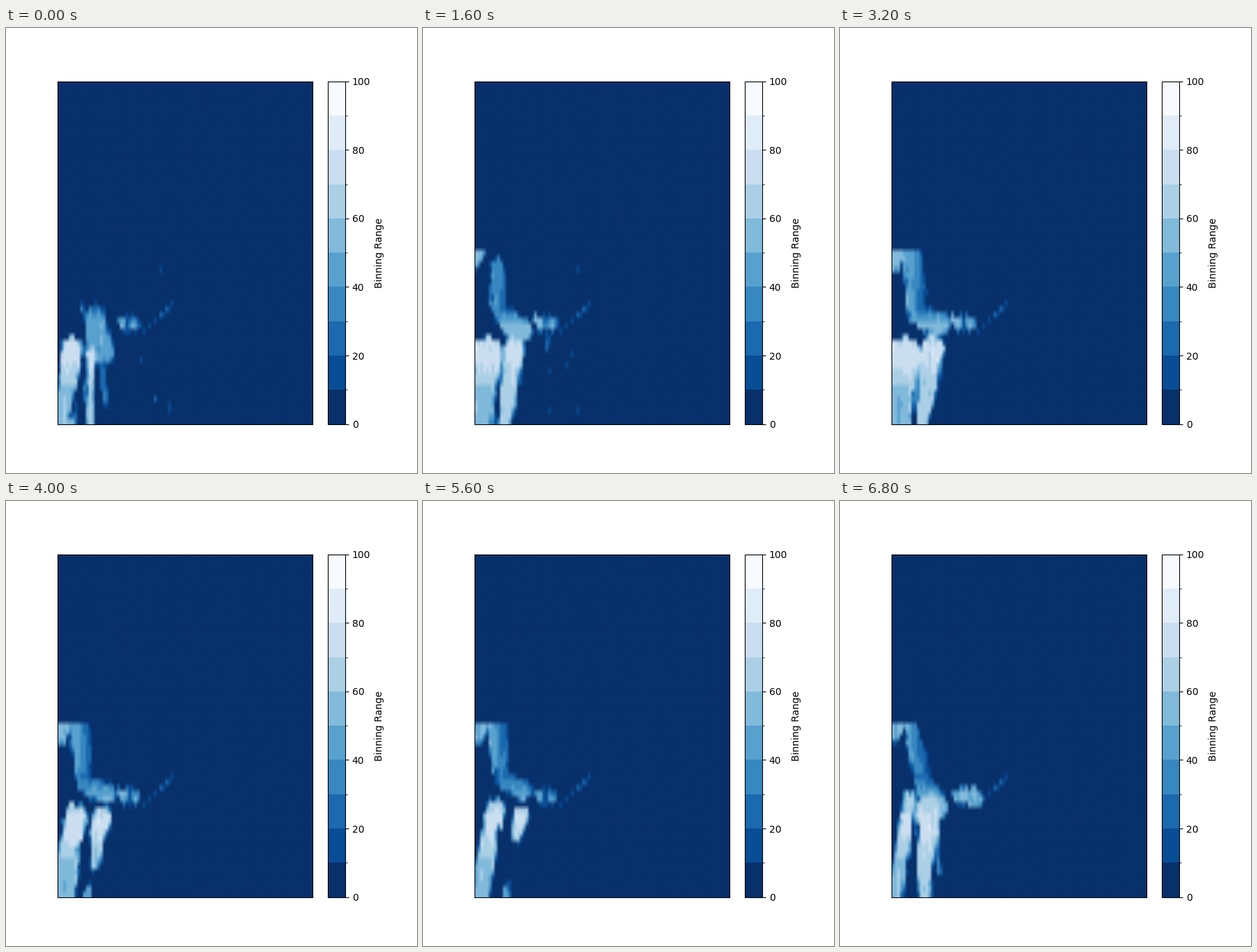
A matplotlib script for the animation above (7.2 s loop, 590x640 px).

```python
import numpy as np
import matplotlib.pyplot as plt
from matplotlib.animation import FuncAnimation
from matplotlib.colors import BoundaryNorm

FRAMES, INTERVAL = 18, 400
COLS, ROWS = 90, 61
LEFT, TOP, WIDTH, HEIGHT = 73.75, 76.8, 365.8, 492.8
CEILING = 320                 # nothing is detected above this line
POSES = (0, 8, 14, 17)        # start, full, hollowed out, refilled

rng = np.random.default_rng(7)
X, Y = np.meshgrid(LEFT + (np.arange(COLS) + 0.5) * WIDTH / COLS,
                   TOP + (np.arange(ROWS) + 0.5) * HEIGHT / ROWS)


def streaks():
    """Unit noise smeared downwards."""
    n = rng.normal(0, 1, (ROWS, COLS))
    return sum(np.roll(n, k, 0) for k in range(4)) / 2


GRAIN = streaks(), streaks()
RAGGED = rng.uniform(-4, 4, COLS)
FLECKS = [(rng.uniform(172, 246), rng.uniform(420, 555), rng.uniform(0, 8))
          for _ in range(9)]


def pose(values, t):
    """Value at time t, easing out from each pose to the next."""
    if np.isscalar(values):
        return values
    k = min(np.searchsorted(POSES, t, side="right") - 1, len(POSES) - 2)
    u = (t - POSES[k]) / (POSES[k + 1] - POSES[k])
    return values[k] + (values[k + 1] - values[k]) * (1 - (1 - u) ** 2)


def field(t):
    phase = 2 * np.pi * t / FRAMES
    grain = GRAIN[0] * np.cos(phase) + GRAIN[1] * np.sin(phase)
    wx, wy = X + 1.3 * grain, Y + RAGGED
    v = np.zeros((ROWS, COLS))

    def stroke(level, *ends):
        """Soft tapered stroke x1, y1, r1 -> x2, y2, r2; r < 0 hides it."""
        x1, y1, r1, x2, y2, r2 = (pose(e, t) for e in ends)
        dx, dy = x2 - x1, y2 - y1
        u = np.clip(((wx - x1) * dx + (wy - y1) * dy) / (dx * dx + dy * dy), 0, 1)
        gap = np.hypot(wx - x1 - u * dx, wy - y1 - u * dy)
        cover = np.clip((r1 + u * (r2 - r1) - gap) / 5 + 0.5, 0, 1)
        v[:] += (level - v) * cover

    def dot(x, y, level):
        spot = level * np.exp(-((X - x) / 3) ** 2 - ((Y - y) / 6) ** 2)
        np.maximum(v, spot, out=v)

    plume = np.clip(50 - 1.1 * (X - 95), 16, 50)
    cloud = np.clip(22 + 0.85 * (Y - 392), 25, pose((46, 56, 56, 56), t))
    body = 64 + 11 * np.exp(-((Y - 468) / 26) ** 2) - 9 * ((Y > 515) & (X < 98))

    # upper plume, corner patch and central cloud
    stroke(plume, (112, 105, 106, 102), (385, 325, 325, 325), (-2, 14, 16, 10),
           (108, 110, 113, 118), (405, 398, 380, 388), (4, 15, 12, 13))
    stroke(53, 74, 318, (-4, 22, 28, 26), 74, 342, (-4, 12, 10, 8))
    stroke(cloud, (126, 112, 112, 116), (412, 414, 396, 400), (14, 12, 10, 12),
           (136, 140, 142, 138), (468, 425, 417, 440), (18, 18, 14, 18))

    # two limbs, the drips below them and the hollows
    stroke(28, 139, 495, (5, -4, -4, 4), 143, 538, (4, -4, -4, 3))
    stroke(45, 118, 575, 6, 118, 552, 5)
    stroke(body, (84, 86, 78, 78), 575, (14, 18, 14, 10),
           (95, 94, 105, 100), (460, 464, 440, 425), (15, 20, 13, 9))
    stroke(body, (120, 117, 133, 119), (575, 575, 488, 575), (5, 8, 4, 8),
           (121, 132, 141, 126), (465, 462, 452, 440), (6, 19, 12, 18))
    stroke(6, (94, 104, 112, 102), (560, 572, 540, 530), (4, 3, 9, 5),
           (112, 105, 112, 108), (480, 520, 475, 465), (4, 2, 7, 4))
    stroke(5, (80, 80, 80, 86), 370, (-4, -4, 9, 6),
           (82, 82, 84, 84), (430, 430, 425, 445), (-4, -4, 8, 6))

    # detached cluster with its dark eye, and the shred under it
    shred = 9 * np.exp(-((t - 5) / 2.5) ** 2) - 3
    stroke(22, 178, 448, shred, 179, 460, shred)
    stroke(50, 169, 422, 10, (181, 185, 181, 192), 426, (9, 9, 9, 14))
    stroke(15, 177, 416, (5, 3, 5, -4), 176, 434, (4, 3, 5, -4))
    dot(167, 423, 64)

    # trail of specks climbing to the right
    for u in np.linspace(0, 1, 6):
        x = 198 + 42 * u
        dot(x, 434 - 37 * u, 15 + 18 * np.exp(-((x - 229) / 9) ** 2))
    for x, y, born in FLECKS:
        if born - 4 <= t < born:
            dot(x, y, 20)
    if t < 8:
        dot(224, 348, 16)

    v += 2.5 * grain * (v > 18)
    v[Y < CEILING] = 0
    return np.clip(v, 0, 99)


fig, ax = plt.subplots(figsize=(5.9, 6.4), dpi=100)
norm = BoundaryNorm(np.arange(0, 101, 10), 256)
im = ax.imshow(field(0), cmap="Blues_r", norm=norm, aspect="auto",
               interpolation="bilinear", interpolation_stage="rgba")
ax.set_xticks([])
ax.set_yticks([])
fig.colorbar(im, ax=ax, label="Binning Range")


def update(t):
    im.set_data(field(t))
    return [im]


anim = FuncAnimation(fig, update, frames=FRAMES, interval=INTERVAL,
                     repeat=True, repeat_delay=0)
plt.show()
```
